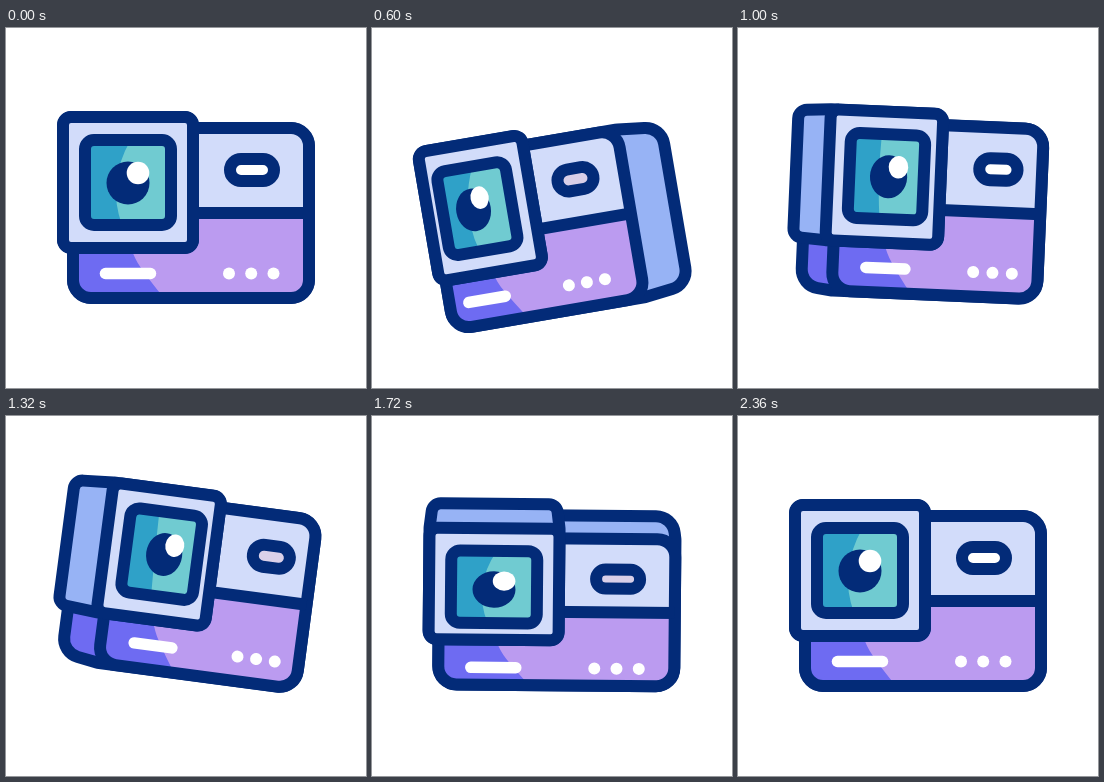
These frames come from a looping animation (360x360 px, 2.4 s). An HTML page with a canvas:

```html
<!DOCTYPE html>
<html lang="en">
<head>
<meta charset="utf-8">
<title>Camera</title>
<style>
  html, body { margin: 0; width: 100%; height: 100%; overflow: hidden; background: #fff; }
  canvas { display: block; width: 360px; height: 360px; }
</style>
</head>
<body>
<canvas id="stage"></canvas>
<script>
const LOOP = 2400, SIZE = 360, LINE = 12;
const INK = '#032b78', PALE = '#d2dcfa', SIDE = '#97b3f5', PURPLE = '#bb9bf0',
      VIOLET = '#6e6bf2', TEAL = '#2fa1c8', AQUA = '#70cbd1', WHITE = '#fff';

// [time, value] steps, eased in and out between neighbours
const ANGLE = [[120, 0], [660, -10], [1210, 8.2], [1820, 0]];
const TURN = [[120, 0], [390, 1], [660, 1], [1080, -1], [1300, -1], [1700, 0]];
const TILT = [[1300, 0], [1700, 1], [2010, 1], [2360, 0]];

const canvas = document.getElementById('stage');
const ctx = canvas.getContext('2d');
const dpr = window.devicePixelRatio || 1;
canvas.width = canvas.height = SIZE * dpr;

function track(steps, t) {
  if (t <= steps[0][0]) return steps[0][1];
  for (let i = 1; i < steps.length; i++) {
    const [t0, a] = steps[i - 1], [t1, b] = steps[i];
    if (t < t1) return a + (b - a) * (1 - Math.cos(Math.PI * (t - t0) / (t1 - t0))) / 2;
  }
  return steps[steps.length - 1][1];
}

const box = (x0, y0, x1, y1) => ({ x0, y0, x1, y1, w: x1 - x0, h: y1 - y0 });
const corners = b => [[b.x0, b.y0], [b.x1, b.y0], [b.x1, b.y1], [b.x0, b.y1]];

function hull(points) {
  const sorted = points.slice().sort((a, b) => a[0] - b[0] || a[1] - b[1]);
  const cross = (o, a, b) => (a[0] - o[0]) * (b[1] - o[1]) - (a[1] - o[1]) * (b[0] - o[0]);
  const chain = list => {
    const out = [];
    for (const p of list) {
      while (out.length > 1 && cross(out[out.length - 2], out[out.length - 1], p) <= 0) out.pop();
      out.push(p);
    }
    out.pop();
    return out;
  };
  return chain(sorted).concat(chain(sorted.reverse()));
}

function roundPoly(points, r) {
  const n = points.length, first = points[0], last = points[n - 1];
  ctx.beginPath();
  ctx.moveTo((first[0] + last[0]) / 2, (first[1] + last[1]) / 2);
  points.forEach((p, i) => {
    const next = points[(i + 1) % n];
    if (i < n - 1) ctx.arcTo(p[0], p[1], next[0], next[1], r);
    else ctx.arcTo(p[0], p[1], (first[0] + p[0]) / 2, (first[1] + p[1]) / 2, r);
  });
  ctx.closePath();
}

function fill(color) { ctx.fillStyle = color; ctx.fill(); }

function stroke(color = INK, width = LINE) {
  ctx.strokeStyle = color;
  ctx.lineWidth = width;
  ctx.stroke();
}

function ellipse(x, y, rx, ry, color) {
  ctx.beginPath();
  ctx.ellipse(x, y, rx, ry, 0, 0, Math.PI * 2);
  fill(color);
}

// Fills a rounded face with paint(), then outlines it
function face(points, r, paint) {
  ctx.save();
  roundPoly(points, r);
  ctx.clip();
  paint();
  ctx.restore();
  roundPoly(points, r);
  stroke();
}

function rect(x, y, w, h, color) {
  ctx.fillStyle = color;
  ctx.fillRect(x, y, w, h);
}

function drawBody({ right, left, up }) {
  const f = box(67 - 4 * right + 37 * left, 100 + 23 * up, 303 - 46 * right, 270);
  const inset = 5 * (right * right + left * left), narrow = 3 * up * up;
  const back = box(67 + narrow + 20 * right, 100 + inset,
                   303 - narrow - 20 * left - 1.5 * right, 270 - inset * 1.1 - 20 * up);
  const sx = f.w / 236, sy = f.h / 170;
  const px = 6 * left - 7.5 * right, py = 4 * up;
  const X = x => f.x0 + (x - 67) * sx, Y = y => f.y0 + (y - 100) * sy;

  face(hull(corners(f).concat(corners(back))), 19, () => {
    rect(0, 0, SIZE, SIZE, SIDE);
    if (left > 0) rect(0, Y(185), f.x0, SIZE, VIOLET);
  });

  face(corners(f), 18, () => {
    rect(f.x0, f.y0, f.w, f.h, PALE);
    rect(f.x0, Y(185), f.w, f.h, PURPLE);
    ctx.beginPath();
    ctx.moveTo(f.x0, Y(185));
    ctx.lineTo(X(117), Y(185));
    ctx.quadraticCurveTo(X(122), Y(222), X(135), Y(240));
    ctx.quadraticCurveTo(X(144), Y(253), X(158), Y(270));
    ctx.lineTo(f.x0, Y(270));
    fill(VIOLET);
  });

  ctx.beginPath();
  ctx.moveTo(f.x0, Y(185));
  ctx.lineTo(f.x1, Y(185));
  stroke();

  // shutter button
  const bx = X(246) + 7 * left - 2 * right, by = Y(142) + py, hw = 22 * sx, hh = 11 * sy;
  const tint = Math.max(0, (Math.max(right, left, up) - 0.85) / 0.15);
  ctx.beginPath();
  ctx.roundRect(bx - hw, by - hh, hw * 2, hh * 2, Math.min(hw, hh));
  fill(`rgb(${255 - 38 * tint}, ${255 - 48 * tint}, ${255 - 23 * tint})`);
  stroke();

  // label bar and dots
  ctx.beginPath();
  ctx.moveTo(X(99.5) + px, Y(245.5) + py);
  ctx.lineTo(X(144.5) + px, Y(245.5) + py);
  ctx.lineCap = 'round';
  stroke(WHITE, 11.5);
  ctx.lineCap = 'butt';
  for (const x of [223, 245.2, 267.5]) ellipse(X(x) + px, Y(245.5) + py, 6, 6, WHITE);
}

function drawLens({ right, left, up }) {
  const f = box(57 + 39 * left, 89 + 24.5 * up, 187 - 25 * right + 18 * left, 220 + 5 * up);
  const inset = 3 * left * left, narrow = 3 * up * up;
  const back = box(57 + narrow, 89 + inset, f.x1 - narrow - 20 * left, f.y1 - inset - 20 * up);
  const sx = f.w / 130, sy = f.h / 131;

  face(hull(corners(f).concat(corners(back))), 9, () => rect(0, 0, SIZE, SIZE, SIDE));
  face(corners(f), 8, () => rect(f.x0, f.y0, f.w, f.h, PALE));

  const gx = f.x0 + 22 * sx + 2.5 * left - 3 * right, gy = f.y0 + 23 * sy + 3 * up - 0.7 * left;
  const g = box(gx, gy, gx + 86 * sx, gy + 85 * sy);
  face(corners(g), 9, () => {
    rect(g.x0, g.y0, g.w, g.h, AQUA);
    ctx.beginPath();
    ctx.moveTo(g.x0, g.y0);
    ctx.lineTo(g.x0 + g.w * (0.53 - 0.14 * left), g.y0);
    ctx.quadraticCurveTo(g.x0 + g.w * (0.25 + 0.15 * left), g.y0 + g.h * 0.5,
                         g.x0 + g.w * 0.43, g.y1);
    ctx.lineTo(g.x0, g.y1);
    fill(TEAL);
  });

  const cx = (g.x0 + g.x1) / 2 + 2.5 * left - 4 * right;
  const cy = (g.y0 + g.y1) / 2 + 0.5 + 2 * up - 0.5 * left;
  ellipse(cx, cy, 21.5 * sx, 21.5 * sy, INK);
  ellipse(cx + 10 * sx + left, cy - 10 * sy - right, 11.3 * sx, 11.3 * sy, WHITE);
}

function draw(t) {
  const turn = track(TURN, t);
  const pose = { right: Math.max(0, turn), left: Math.max(0, -turn), up: track(TILT, t) };
  const pivot = { x: 260 + 14 * pose.left, y: 174 - 6 * pose.left };
  ctx.setTransform(dpr, 0, 0, dpr, 0, 0);
  rect(0, 0, SIZE, SIZE, WHITE);
  ctx.translate(pivot.x, pivot.y);
  ctx.rotate(track(ANGLE, t) * Math.PI / 180);
  ctx.translate(-pivot.x, -pivot.y);
  drawBody(pose);
  drawLens(pose);
}

const start = performance.now();
function tick() {
  draw((performance.now() - start) % LOOP);
  requestAnimationFrame(tick);
}
tick();
</script>
</body>
</html>
```
